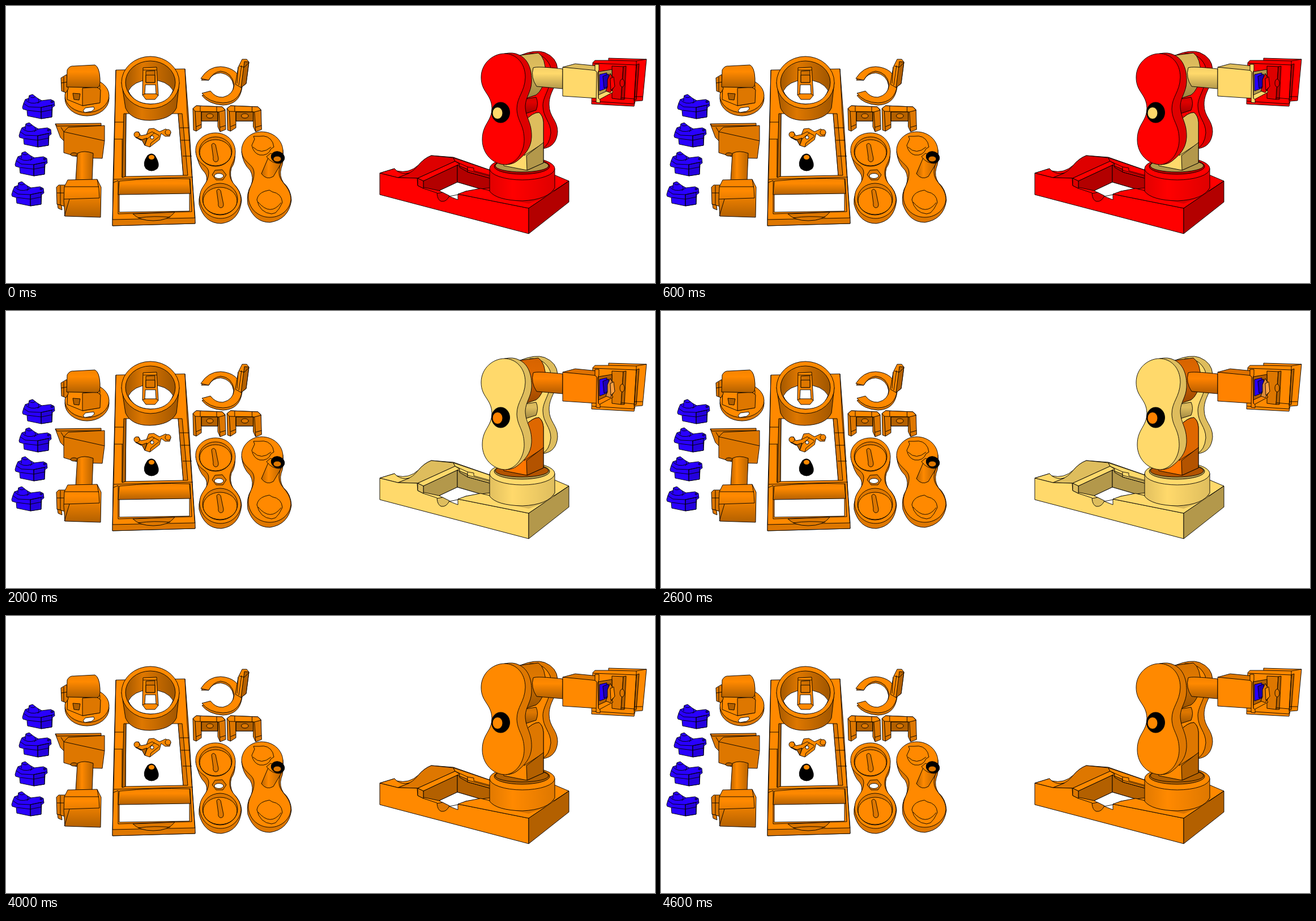
These frames come from a looping animation (1146x489 px, 5000 ms). An HTML page:

```html
<!DOCTYPE html>
<html lang="en">
<head>
<meta charset="utf-8">
<title>Robot arm kit</title>
<style>
html, body { margin: 0; width: 100%; height: 100%; overflow: hidden; background: #fff; }
svg { display: block; width: 100vw; height: 100vh; stroke: #000; stroke-width: .9; stroke-linejoin: round; }
.kit { --tone: #ff8900; }
.servo { --tone: #2900ff; }
.body { --tone: var(--body); }
.joint { --tone: var(--joint); }
.arm { --tone: var(--arm); }
.hand { --tone: var(--hand); }
.gear { --tone: var(--gear); }
.m { fill: var(--tone); }
.s { fill: color-mix(in srgb, var(--tone) 87%, #000); }
.d { fill: color-mix(in srgb, var(--tone) 70%, #000); }
.w { fill: #fff; }
.k { fill: #000; }
.l { fill: none; }
.v { fill: url(#vertical); stroke: none; }
.h { fill: url(#horizontal); stroke: none; }
</style>
</head>
<body>
<svg id="stage" viewBox="0 0 1146 489">
<defs>
  <linearGradient id="vertical" x2="0" y2="1">
    <stop offset="0" stop-opacity=".04"/><stop offset=".3" stop-opacity="0"/><stop offset="1" stop-opacity=".3"/>
  </linearGradient>
  <linearGradient id="horizontal">
    <stop offset="0" stop-opacity=".26"/><stop offset=".35" stop-opacity="0"/><stop offset="1" stop-opacity=".28"/>
  </linearGradient>
  <g id="servo" class="servo">
    <path class="m" d="M29 179L31 172 34 165 40 163 41 158 47 156 52 160 56 163 63 167 79 165 85 168 86 176 82 179 81 196 62 199 38 194 37 184 30 182Z"/>
    <path class="s" d="M62 179L81 175 81 196 62 199Z"/>
    <path class="l" d="M31 172L40 178 62 179 85 174M62 199V179M38 184L62 187 82 183M34 165Q42 175 58 170L63 167M41 159Q46 164 52 160M56 163Q60 168 56 172M40 163V168"/>
    <ellipse class="d" cx="81" cy="169" rx="2" ry="1.6"/>
  </g>
  <g id="clip">
    <path class="s" d="M330 181L336 176 382 178 387 183 388 218 378 222 374 213 374 203 345 203 345 215 336 221 331 219Z"/>
    <path class="m" d="M330 181L336 176 382 178 387 184 376 187 334 186Z"/>
    <path class="d" d="M345 187H374V203H345Z"/>
    <path class="l" d="M334 186L336 221M376 187L378 222M345 187V203M374 187V203M343 177V186M372 178V187M336 213L345 209M378 214L388 211"/>
    <ellipse class="s" cx="360" cy="194" rx="6" ry="4"/>
  </g>
</defs>

<use href="#servo"/>
<use href="#servo" x="-6" y="50"/>
<use href="#servo" x="-13" y="101"/>
<use href="#servo" x="-19" y="154"/>

<g class="kit">
  <!-- turret -->
  <ellipse class="s" cx="143" cy="163" rx="39" ry="31"/>
  <ellipse class="m" cx="143" cy="158" rx="39" ry="30"/>
  <path class="m" d="M109 142L108 165 135 176 165 171 166 140Z"/>
  <path class="s" d="M135 145L160 143 167 148 166 171 135 176Z"/>
  <path class="s" d="M97 127L107 121 110 146 106 153 98 150Z"/>
  <path class="l" d="M97 136L109 134M102 125V151"/>
  <path class="m" d="M107 143L108 113Q112 105 120 106L157 104Q165 108 166 128Q167 145 160 144Z"/>
  <path class="v" d="M107 143L108 113Q112 105 120 106L157 104Q165 108 166 128Q167 145 160 144Z"/>
  <path class="d" d="M118 154L131 155 129 166 120 165Z"/>
  <path class="w" d="M136 185L140 180 155 178 156 182 151 186 139 188Z"/>

  <!-- forearm -->
  <path class="s" d="M87 208L168 207V213L106 242 96 232Z"/>
  <path class="s" d="M102 222L110 214 174 211 174 238 170 269 132 268 102 259Z"/>
  <path class="l" d="M87 208L90 212 168 211M102 222L174 238M97 214L102 222"/>
  <ellipse class="d" cx="120" cy="262" rx="6" ry="3"/>
  <path class="m" d="M126 260Q138 254 154 260L152 309H123Z"/>
  <path class="h" d="M126 260Q138 254 154 260L152 309H123Z"/>
  <path class="s" d="M89 320L93 316 105 316V354L90 350Z"/>
  <path class="s" d="M91 350L98 352 99 360 92 357Z"/>
  <path class="m" d="M103 319L109 307 161 306 168 320 167 373 104 371 102 344Z"/>
  <path class="v" d="M103 319L109 307 161 306 168 320 167 373 104 371 102 344Z"/>
  <path class="l" d="M103 319H164M161 306Q165 323 165 339M102 341L165 339M112 341L103 371M90 330H102M96 317V351"/>

  <!-- base -->
  <path class="m" fill-rule="evenodd" d="M194 113L316 111 322 190 334 384 188 388 189 308ZM212 190L211 301 313 299 304 190ZM200 331V364L324 362V330Z"/>
  <path class="s" d="M188 377L334 374V384L188 388Z"/>
  <path class="d" d="M208 190L212 190 211 301 205 303Z"/>
  <path class="s" d="M304 190L311 190 321 299 313 299Z"/>
  <path class="l" d="M194 113L190 308 188 377M316 111L320 190 334 374M190 306L330 302M192 205H208M191 235H206M205 235V302M307 215H323M309 237H325M312 265H328M189 312L198 308V367L328 363 325 304"/>
  <path class="m" d="M200 309Q260 303 324 305L326 331 198 333Z"/>
  <path class="v" d="M200 309Q260 303 324 305L326 331 198 333Z"/>
  <path class="s" d="M224 367L298 364Q287 379 260 379Q236 379 224 367Z"/>
  <path class="l" d="M233 374Q262 370 290 373"/>

  <!-- socket -->
  <path class="s" d="M204 135L211 180Q221 202 254 202Q291 201 301 180L306 135Z"/>
  <path class="h" d="M204 135L211 180Q221 202 254 202Q291 201 301 180L306 135Z"/>
  <ellipse class="m" cx="255" cy="135" rx="51" ry="46"/>
  <ellipse class="s" cx="255" cy="135" rx="44" ry="38"/>
  <ellipse class="h" cx="255" cy="135" rx="44" ry="38"/>
  <path class="w" d="M216 150Q225 132 254 130Q285 131 295 149Q286 173 255 173Q226 172 216 150Z"/>
  <path class="m" fill-rule="evenodd" d="M242 109L266 108 269 158 263 165H247L241 157ZM247 115V135H263V114ZM246 139L245 155H265L264 139Z"/>
  <path class="s" d="M247 122H263V135H247Z"/>
  <path class="l" d="M241 157L246 155M269 158L265 155M242 113H266"/>

  <!-- gripper lever -->
  <path class="m" d="M227 224L234 222 238 229 248 227 252 217 261 216 271 222 282 217 291 223 289 230 281 230 274 225 271 236 254 249 245 246 249 235 238 237 229 232Z"/>
  <path class="d" d="M229 232L240 236 249 233 245 246 240 237Z"/>
  <path class="l" d="M248 227L258 222 271 229M249 235L262 224M254 249L256 242 271 230"/>
  <circle class="m" cx="231" cy="227" r="5"/>
  <circle class="m" cx="286" cy="223" r="5"/>
  <circle class="w" cx="258" cy="232" r="3"/>

  <!-- knob -->
  <path class="k" d="M250 264Q257 258 263 264Q273 280 267 287Q257 295 247 287Q240 278 250 264Z"/>
  <ellipse class="m" cx="257" cy="267" rx="5.5" ry="4.5"/>

  <!-- hook -->
  <path class="s" d="M345 131Q358 110 379 110Q411 112 417 143Q413 174 383 175Q357 173 346 158L361 153Q370 165 383 164Q401 160 402 141Q399 121 379 118Q364 119 358 131Z"/>
  <path class="m" d="M344 128Q357 107 379 107Q412 109 417 140Q413 170 383 171Q358 170 346 154L361 150Q370 162 383 161Q401 157 403 139Q399 117 379 115Q365 117 358 131Z"/>
  <path class="m" d="M410 108L417 94 425 94 429 99 424 137 415 144 405 138Z"/>
  <path class="d" d="M421 98L429 99 424 137 415 144Z"/>
  <path class="l" d="M412 106L421 108 429 100M410 108L408 137M416 105L411 140"/>

  <use href="#clip"/>
  <use href="#clip" transform="translate(42 0) scale(1.055 1)"/>

  <!-- link with pockets -->
  <path class="s" d="M335 257Q340 284 351 294Q357 302 353 314Q339 331 341 350Q350 384 380 384Q412 380 416 343Q415 326 401 313Q394 300 398 286Q406 275 404 258Z"/>
  <path class="m" d="M370 224C349 224 334 239 335 256C336 282 358 278 358 295C357 316 341 318 342 341C344 362 360 375 379 375C400 375 415 358 415 340C413 318 396 315 395 297C394 281 405 276 405 257C404 237 389 224 370 224Z"/>
  <ellipse class="s" cx="370" cy="257" rx="29" ry="26"/>
  <ellipse class="m" cx="370" cy="259" rx="28" ry="23"/>
  <ellipse class="s" cx="378" cy="341" rx="31" ry="28"/>
  <ellipse class="m" cx="378" cy="344" rx="30" ry="24"/>
  <path id="slot" class="s" d="M363 245Q366 240 370 245L375 269Q375 276 369 275Q365 273 366 267Z"/>
  <use href="#slot" x="9" y="81"/>
  <path class="s" d="M364 298L369 290 382 289 389 298 383 307 371 307Z"/>
  <ellipse class="w" cx="376" cy="300" rx="8" ry="4.5"/>

  <!-- link with axle -->
  <path class="s" d="M416 257Q418 278 431 290Q438 302 433 316Q424 330 427 350Q438 382 466 382Q499 377 504 343Q503 323 490 312Q482 300 486 286Q491 275 489 254Z"/>
  <path class="m" d="M451 222C431 222 416 238 416 255C417 277 438 278 438 295C438 314 427 319 428 339C430 360 447 373 466 373C487 373 504 357 503 338C500 316 482 311 482 294C482 278 490 273 489 254C487 235 471 222 451 222Z"/>
  <path class="m" d="M434 246L439 235 437 230 447 230Q464 227 471 241L473 249 468 252Q463 265 448 263Q437 260 434 246Z"/>
  <path class="m" d="M443 342Q445 331 457 327L465 325 470 328Q487 331 488 347L482 358 476 365 469 367Q448 365 443 342Z"/>
  <path class="l" d="M436 249Q451 264 468 249M445 346Q467 372 486 347"/>
  <path class="m" d="M451 296L463 268 487 276 472 301Q460 308 451 296Z"/>
  <path class="h" d="M451 296L463 268 487 276 472 301Q460 308 451 296Z"/>
  <path class="m" d="M460 266L467 260 488 269 485 278Q470 279 460 266Z"/>
  <ellipse class="k" cx="480" cy="267" rx="12" ry="10" transform="rotate(20 480 267)"/>
  <ellipse class="s" cx="479" cy="270" rx="7" ry="5"/>
</g>

<!-- assembled base -->
<g class="body">
  <path class="m" d="M660 295L686 287 690 291Q712 296 728 281Q738 269 751 264L790 267 856 290 968 298 994 309 923 357 798 331 769 338 727 317Z"/>
  <path class="s" d="M692 303L706 297Q718 294 728 281Q738 269 751 264L790 268 793 274 727 304Z"/>
  <path class="m" d="M660 295L686 287 690 291Q700 298 712 295L692 303Z"/>
  <path class="m" d="M727 304L793 274 801 279 737 309Z"/>
  <path class="d" d="M737 309L797 281 797 311 765 326 737 320Z"/>
  <path class="d" d="M797 281L815 288 815 293 855 304V321L838 323 797 311Z"/>
  <path class="m" d="M793 274L815 284 815 290 855 301V290L790 268Z"/>
  <path class="l" d="M801 279V285L815 293 855 304M815 284L826 286 826 291 855 299"/>
  <path class="w" d="M765 326L797 311 838 323 812 327 798 333 783 336Z"/>
  <path class="m" d="M660 295L692 303 726 304 727 317 737 322 761 330Q769 341 780 335L798 342V332L923 357V402L660 333Z"/>
  <path class="s" d="M727 304L737 309V322L727 317Z"/>
  <path class="s" d="M761 331L771 329 783 335Q778 346 769 345Q762 343 761 331Z"/>
  <path class="m" d="M798 332L812 327 838 322 855 326 900 342 968 326 994 309 923 357Z"/>
  <path class="d" d="M923 357L994 309V346L923 402Z"/>
  <path class="d" d="M885 341Q940 345 969 323L966 332 923 349Z" stroke="none" opacity=".5"/>
  <path class="m" d="M854 287V327Q866 343 912 344Q957 342 969 321V287Z"/>
  <path class="h" d="M854 287V327Q866 343 912 344Q957 342 969 321V287Z" opacity=".45"/>
  <ellipse class="m" cx="911.5" cy="287" rx="57.5" ry="20"/>
  <ellipse class="d" cx="911" cy="283" rx="49" ry="14"/>
</g>

<!-- turret and rear link -->
<g class="joint">
  <ellipse class="d" cx="911" cy="282" rx="47" ry="11"/>
</g>
<g class="body">
  <path class="s" d="M908 87Q935 76 951 82Q973 91 974 112C974 144 959 150 959 174C959 196 974 201 974 222Q972 250 946 252L915 242V135Z"/>
  <path class="m" d="M925 84Q951 83 961 106C967 143 948 156 948 176C948 197 962 204 962 224Q960 246 946 252L915 242V120Z"/>
  <path class="s" d="M912 165L936 161Q941 172 936 184L914 191Z"/>
  <path class="v" d="M912 165L936 161Q941 172 936 184L914 191Z"/>
</g>
<g class="joint">
  <path class="m" d="M879 282L879 265 916 203Q930 188 941 188Q948 193 949 205V277L920 290Z"/>
  <path class="s" d="M916 203Q930 188 941 188Q948 193 949 205V242L915 264Z"/>
  <path class="d" d="M919 264L949 241V277L920 290Z"/>
  <path class="s" d="M900 88L940 83Q953 91 953 122Q948 149 936 157L918 163V110Z"/>
  <path class="v" d="M900 88L940 83Q953 91 953 122Q948 149 936 157L918 163V110Z"/>
</g>

<!-- front link -->
<g class="body">
  <path class="s" d="M880 84Q896 81 905 86C922 93 929 112 928 135C927 152 918 160 917 176C917 198 929 205 928 232C927 252 915 264 902 274Q894 280 882 280Z"/>
  <path class="m" d="M880 84C860 84 839 101 839 126C839 152 857 155 858 180C858 204 841 208 841 236C841 262 861 280 882 280C900 279 916 258 915 234C914 208 903 204 902 182C902 160 916 152 917 126C917 100 900 84 880 84Z"/>
</g>
<ellipse class="k" cx="873.5" cy="188" rx="16" ry="18"/>
<g class="arm"><ellipse class="m" cx="868" cy="189" rx="9" ry="10.5"/></g>

<!-- gripper -->
<g class="hand">
  <path class="m" d="M1036 100L1040 96 1064 96V92L1131 94 1124 167 1111 168 1109 177 1034 173Z"/>
  <path class="d" d="M1113 104L1118 102 1113 165 1109 167Z"/>
  <path class="s" d="M1070 106L1090 107 1086 165 1070 163Z"/>
  <path class="d" d="M1090 107L1095 106 1092 165 1086 165Z"/>
  <path class="l" d="M1064 96L1113 97 1131 94M1113 97V104M1037 101L1113 104M1035 168L1109 173M1113 104L1109 173M1087 162L1109 164M1109 160L1124 160"/>
  <ellipse class="s" cx="1088" cy="136" rx="4" ry="7"/>
</g>

<!-- forearm and servo -->
<g class="arm">
  <path class="m" d="M931 109Q937 106 983 111V146L937 142Q926 126 931 109Z"/>
  <path class="v" d="M931 109Q937 106 983 111V146L937 142Q926 126 931 109Z"/>
  <path class="s" d="M983 108L1005 102 1046 106 1044 116Z"/>
  <path class="m" d="M983 108L1044 114V163L983 159Z"/>
  <path class="d" d="M1046 116L1070 112V151L1046 164Z"/>
  <path class="m" d="M1046 157L1068 147 1072 152 1046 166Z"/>
</g>
<g class="servo">
  <path class="m" d="M1048 121L1061 118V145L1048 150Z"/>
  <path class="d" d="M1054 124L1064 120 1066 141 1056 145Z"/>
</g>
<g class="gear">
  <path class="s" d="M1062 130L1067 119 1072 128 1073 144 1067 153 1059 150 1062 143Z"/>
  <path class="m" d="M1067 128L1073 125 1075 142 1068 149Z"/>
</g>
<g class="arm">
  <path class="m" d="M1040 103H1047V113L1045 118 1046 163 1049 165V171L1042 170 1043 116 1040 114Z"/>
</g>
</svg>
<script>
const parts = ["body", "joint", "arm", "hand", "gear"];
const themes = [
  ["#ff0000", "#ffd96b", "#ffd96b", "#ff0000", "#ff0000"],
  ["#008a46", "#ffcc78", "#ffd96b", "#008a46", "#008a46"],
  ["#ffd96b", "#ff7600", "#ff8200", "#ff8900", "#ffa040"],
  ["#ff8900", "#007f0e", "#408c00", "#408c00", "#00874a"],
  ["#ff8900", "#ff8900", "#ff8900", "#ff8900", "#ff8900"]
];
const stepMs = 1000;
const stage = document.getElementById("stage");
let shown = -1;

function tick() {
  const step = Math.floor(performance.now() / stepMs) % themes.length;
  if (step !== shown) {
    parts.forEach((part, i) => stage.style.setProperty("--" + part, themes[step][i]));
    shown = step;
  }
  requestAnimationFrame(tick);
}
tick();
</script>
</body>
</html>
```
